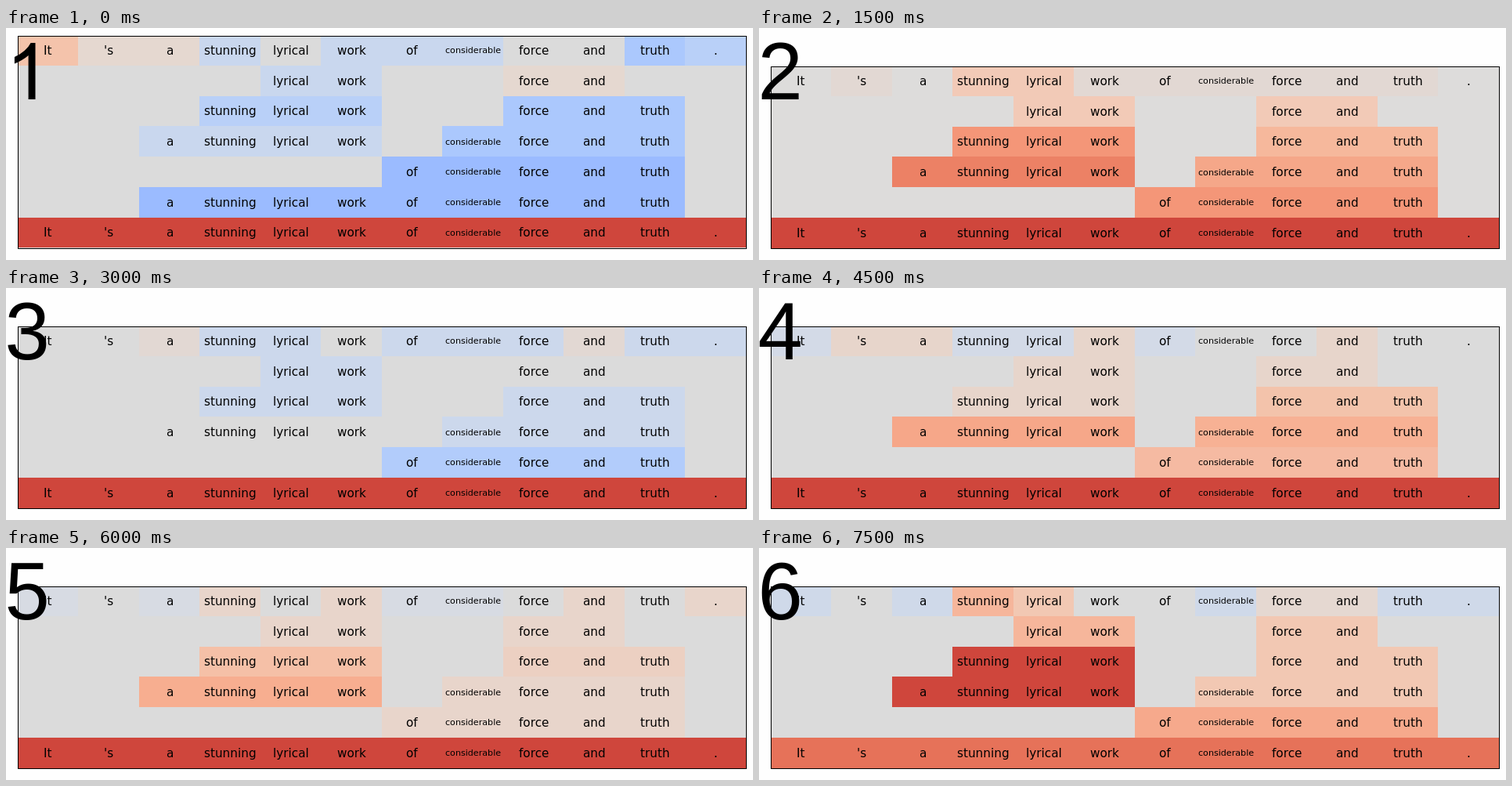
Animation, 954 px wide and 296 px high, one loop 8000 ms. Source, as an HTML page with a canvas:

```html
<!DOCTYPE html>
<html lang="en">
<head>
<meta charset="utf-8">
<title>Sentence heat map</title>
<style>
html, body { margin: 0; width: 100%; height: 100%; overflow: hidden; background: #fefefe; }
canvas { display: block; }
</style>
</head>
<body>
<canvas id="stage" width="954" height="296"></canvas>
<script>
const ctx = document.getElementById('stage').getContext('2d');
const words = "It 's a stunning lyrical work of considerable force and truth .".split(' ');

const LOOP = 8000, STEP = 1500;
const LEFT = 15, RIGHT = 945, BOTTOM = 281;
const CELL_W = 77.5, CELL_H = 38.7;

// Phrase spans [first word, last word] of each row between the words and the sentence.
const phraseRows = [
  [[4, 5], [8, 9]],
  [[3, 5], [8, 10]],
  [[2, 5], [7, 10]],
  [[6, 10]]
];
const longPhraseRow = [[2, 10]];
const sentenceRow = [[0, 11]];

// Letters index the palette; "." is neutral. `words` has one letter per word,
// `phrases` one per span in reading order, ending with the whole sentence.
const scenes = [
  { words: 'aeel.lll..tm', phrases: 'lemtltbbr', tall: true,
    palette: { '.': '#dbdbdb', a: '#f4c3ab', e: '#e5d8d0', l: '#c9d7ee', m: '#b9d0f8', t: '#abc8fd', b: '#9bbbff', r: '#cf463c' } },
  { words: '.e.ppeeeeee.', phrases: 'pposdqor',
    palette: { '.': '#dddcdb', e: '#e2d8d3', p: '#f2cab7', s: '#f6b89c', q: '#f5a789', o: '#f49678', d: '#ec8165', r: '#cf463c' } },
  { words: '..ell.lllell', phrases: 'l.ll.lmr',
    palette: { '.': '#dbdbdb', e: '#e2d8d3', l: '#ccd8ec', m: '#b2ccfb', r: '#cf463c' } },
  { words: 'leellel..e..', phrases: 'eeepoqsr',
    palette: { '.': '#dbdbdb', l: '#d3dae7', e: '#e7d5cb', p: '#f3c3ab', s: '#f5baa2', q: '#f7b194', o: '#f6a789', r: '#cf463c' } },
  { words: 'l.le.ell.e.e', phrases: 'eepdoeer',
    palette: { '.': '#dbdbdb', l: '#d7dbe3', e: '#e8d5cb', d: '#ecd0c2', p: '#f5c0a7', o: '#f7ae90', r: '#cf463c' } },
  { words: 'l.lsp..leell', phrases: 'sprprpod',
    palette: { '.': '#dbdbdb', l: '#cfd9e9', e: '#e5d8d1', p: '#f2c8b3', s: '#f6b69b', o: '#f6a98c', d: '#e67259', r: '#cf463c' } }
];

// Centers the inked part of a word, on whole pixels.
function drawWord(word, centerX, centerY) {
  const small = word.length > 8;
  ctx.font = `${small ? 11.11 : 15.28}px "DejaVu Sans", sans-serif`;
  const ink = ctx.measureText(word);
  const x = centerX - (ink.actualBoundingBoxRight - ink.actualBoundingBoxLeft) / 2;
  ctx.fillText(word, Math.round(x), Math.round(centerY + (small ? 3.3 : 4.88)));
}

function drawSpan(y, first, last, color, top) {
  const x1 = Math.floor(LEFT + first * CELL_W);
  const x2 = Math.floor(LEFT + (last + 1) * CELL_W);
  const y1 = Math.max(top, Math.floor(y + 0.01));
  ctx.fillStyle = color;
  ctx.fillRect(x1, y1, x2 - x1, Math.floor(y + CELL_H + 0.01) - y1);

  ctx.fillStyle = '#000';
  for (let i = first; i <= last; i++) {
    drawWord(words[i], LEFT + (i + 0.5) * CELL_W, y + CELL_H / 2);
  }
}

function drawNumber(n) {
  ctx.fillStyle = '#000';
  if (n > 1) {
    ctx.font = '103px "Liberation Sans", Arial, sans-serif';
    ctx.fillText(n, -1.5, 91);
    return;
  }
  // A one without a foot.
  ctx.fill(new Path2D('M37.5 91H28.6V35Q25.3 38 20.1 41T10.9 45.6V37Q18.3 33.6 23.8 28.7T31.6 19H37.5Z'));
}

function drawScene(index) {
  const { palette, tall, words: wordKeys, phrases } = scenes[index];
  const rows = [...phraseRows, ...(tall ? [longPhraseRow] : []), sentenceRow];
  const top = tall ? 10 : 49;
  const gridBottom = tall ? BOTTOM - 0.3 : BOTTOM;
  const rowY = row => gridBottom - CELL_H * (rows.length + 1 - row);

  ctx.fillStyle = '#fefefe';
  ctx.fillRect(0, 0, 954, 296);
  ctx.fillStyle = palette['.'];
  ctx.fillRect(LEFT, top, RIGHT - LEFT, BOTTOM - top);

  words.forEach((_, i) => drawSpan(rowY(0), i, i, palette[wordKeys[i]], top));
  let span = 0;
  rows.forEach((spans, r) => spans.forEach(([first, last]) => {
    drawSpan(rowY(r + 1), first, last, palette[phrases[span++]], top);
  }));

  ctx.strokeStyle = '#000';
  ctx.lineWidth = 1;
  ctx.strokeRect(LEFT + 0.5, top + 0.5, RIGHT - LEFT, BOTTOM - top);
  drawNumber(index + 1);
}

function tick() {
  drawScene(Math.floor(performance.now() % LOOP / STEP));
  requestAnimationFrame(tick);
}
tick();
</script>
</body>
</html>
```
